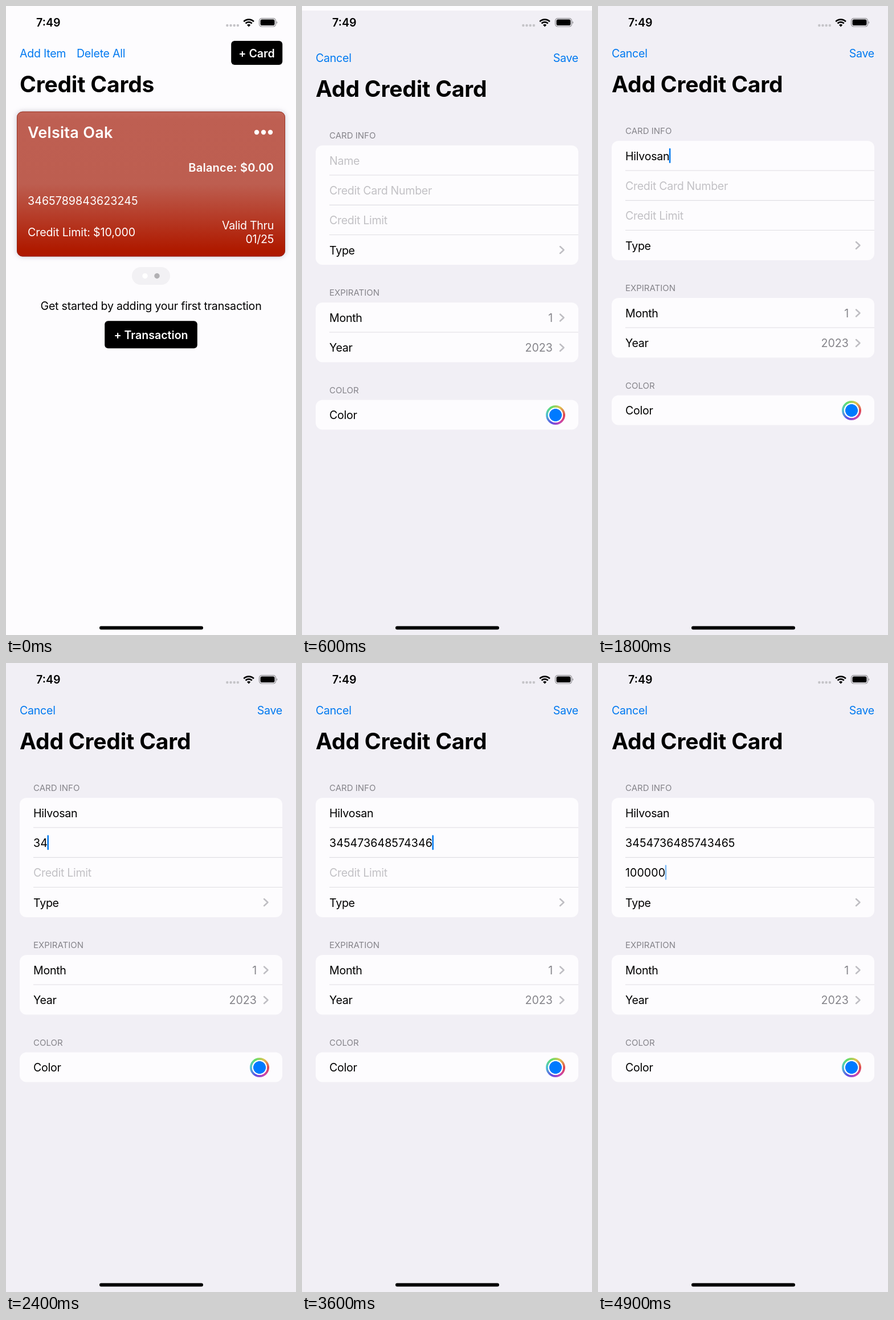
Recreate the animation shown at these times as an HTML page. Size 509 px wide and 1101 px high, loop 5 s.

```html
<!DOCTYPE html>
<html lang="en">
<head>
<meta charset="utf-8">
<title>Add a credit card</title>
<style>
  html, body { margin: 0; width: 100%; height: 100%; overflow: hidden; background: #fdfcfe; }
  svg { display: block; width: 100%; height: 100%; }
  text { font: 400 19.6px Inter, Roboto, sans-serif; letter-spacing: -.014em; font-optical-sizing: none; white-space: pre; }
  .title { font-size: 39px; font-weight: 700; letter-spacing: -.005em; }
  .semi { font-weight: 600; letter-spacing: 0; }
  .bank { font-size: 27px; font-weight: 600; letter-spacing: .01em; }
  .balance { font-size: 20px; font-weight: 600; letter-spacing: .012em; }
  .digits { letter-spacing: .003em; }
  .caption { font-size: 15px; letter-spacing: 0; fill: #85848a; }
  .link { fill: #0079f0; }
  .light { fill: #fff; }
  .hint { fill: #c2c1c5; letter-spacing: -.016em; }
  .value { fill: #85848a; }
  .end { text-anchor: end; }
  .mid { text-anchor: middle; }
  .panel { fill: #fdfcfe; }
  .rule { stroke: #dfdee3; stroke-width: 1.2; }
  .cardShade { filter: drop-shadow(0 0 5px rgba(90, 90, 125, .34)); }
  .wheel {
    width: 34px; height: 34px; border-radius: 50%;
    background:
      radial-gradient(circle, #007aff 10.6px, #fdfcfe 11.3px 12.9px, transparent 13.6px),
      conic-gradient(from 90deg, #e0454f, #c844b4, #5a50e6, #52c2d2, #5fdf6c, #dfc44e, #e0454f);
  }
</style>
</head>
<body>
<svg viewBox="0 0 509 1101" preserveAspectRatio="none">
  <defs>
    <linearGradient id="red" x2="0" y2="1">
      <stop offset="0" stop-color="#c26558"/>
      <stop offset=".06" stop-color="#be5f52"/>
      <stop offset=".5" stop-color="#bd5e50"/>
      <stop offset=".95" stop-color="#af1a00"/>
      <stop offset="1" stop-color="#ae1800"/>
    </linearGradient>
    <path id="chevron" d="M453 -6l6.5 6l-6.5 6" fill="none" stroke="#bfbec3" stroke-width="2.5" stroke-linecap="round" stroke-linejoin="round"/>
  </defs>

  <rect width="509" height="1101" fill="#fdfcfe"/>
  <g id="home">
    <text class="link" x="24" y="89.5">Add Item</text>
    <text class="link" x="124" y="89.5">Delete All</text>
    <rect id="cardButton" x="395.2" y="61" width="90" height="42" rx="6"/>
    <text id="cardLabel" class="semi light mid" x="440" y="89.5">+ Card</text>
    <text class="title" x="24" y="151">Credit Cards</text>

    <rect class="cardShade" x="19" y="184.7" width="471" height="253.8" rx="10" fill="url(#red)"/>
    <rect x="19.5" y="185.2" width="470" height="252.8" rx="9.5" fill="none" stroke="#8e2413" stroke-opacity=".75"/>
    <g class="light">
      <text class="bank" x="38" y="231">Velsita Oak</text>
      <circle cx="440" cy="221" r="4.2"/>
      <circle cx="452" cy="221" r="4.2"/>
      <circle cx="464" cy="221" r="4.2"/>
      <text class="balance end" x="470" y="290">Balance: $0.00</text>
      <text class="digits" x="38" y="347.5">3465789843623245</text>
      <text x="38" y="402.5" style="letter-spacing:-.006em">Credit Limit: $10,000</text>
      <text class="end" x="470" y="391">Valid Thru</text>
      <text class="end" x="470" y="415">01/25</text>
    </g>

    <rect x="221" y="457" width="67" height="31" rx="15.5" fill="#f2f1f4"/>
    <circle cx="244" cy="472.5" r="4.7" fill="#fff"/>
    <circle cx="265" cy="472.5" r="4.7" fill="#b1b0b3"/>
    <text class="mid" x="254.5" y="532" style="letter-spacing:-.011em">Get started by adding your first transaction</text>
    <rect x="173.2" y="551.2" width="162.6" height="48" rx="6"/>
    <text class="semi light mid" x="254.5" y="583">+ Transaction</text>
  </g>

  <g id="sheet">
    <rect width="509" height="1101" fill="#f1eff5"/>
    <text class="link" x="24" y="89.5">Cancel</text>
    <text class="link end" x="485" y="89.5">Save</text>
    <text class="title" x="24" y="151">Add Credit Card</text>

    <text class="caption" x="48" y="224">CARD INFO</text>
    <rect class="panel" x="24" y="236" width="461" height="209" rx="12"/>
    <path class="rule" d="M48 288H485M48 340.3H485M48 392.5H485"/>
    <text class="field" x="48" y="269.5"></text>
    <text class="field digits" x="48" y="322"></text>
    <text class="field digits" x="48" y="374"></text>
    <rect id="caret" width="2.5" height="26" rx="1.2" fill="#0079f0"/>
    <text x="48" y="426.5">Type</text>
    <use href="#chevron" y="419"/>

    <text class="caption" x="48" y="499">EXPIRATION</text>
    <rect class="panel" x="24" y="511" width="461" height="104.5" rx="12"/>
    <path class="rule" d="M48 563H485"/>
    <text x="48" y="544.5">Month</text>
    <text class="value end" x="440" y="544.5">1</text>
    <use href="#chevron" y="537.5"/>
    <text x="48" y="597">Year</text>
    <text class="value digits end" x="440" y="597">2023</text>
    <use href="#chevron" y="590"/>

    <text class="caption" x="48" y="669.5">COLOR</text>
    <rect class="panel" x="24" y="681.5" width="461" height="52" rx="12"/>
    <text x="48" y="715">Color</text>
    <foreignObject x="428" y="690.5" width="34" height="34"><div class="wheel"></div></foreignObject>
  </g>

  <g id="status">
    <text class="semi" x="53" y="36">7:49</text>
    <g fill="#c5c4c8">
      <circle cx="388.3" cy="34" r="2.2"/>
      <circle cx="394.5" cy="34" r="2.2"/>
      <circle cx="400.7" cy="34" r="2.2"/>
      <circle cx="406.9" cy="34" r="2.2"/>
    </g>
    <g fill="none" stroke="#000" stroke-width="2.7">
      <path d="M417.3 27.2a12.6 12.6 0 0 1 17.6 0"/>
      <path d="M420.5 30.5a8 8 0 0 1 11.2 0"/>
    </g>
    <path d="M426.1 36.4l-3.1-3.2a4.5 4.5 0 0 1 6.2 0z"/>
    <rect x="444.5" y="21.7" width="29" height="14.3" rx="4.4" fill="none" stroke="#8d8c90" stroke-width="1.2"/>
    <rect x="446.5" y="23.6" width="25" height="10.5" rx="2.8"/>
    <path d="M474.8 26.5q3 2.3 0 4.8z" fill="#8d8c90"/>
    <rect x="164" y="1085.5" width="182" height="6" rx="3"/>
  </g>
</svg>

<script>
  const TICK = 100, TICKS = 50;
  const byId = id => document.getElementById(id);
  const start = performance.now();

  // Each track lists [tick, value]; a value holds until the next entry.
  const at = (track, tick) => track.findLast(([from]) => from <= tick)[1];

  const sheetTop = [[0, 1101], [5, 802], [6, 8], [7, 1], [8, 0]];
  const buttonAlpha = [[0, 1], [1, .75], [2, .5], [3, .35], [4, .3]];
  const focus = [[0, -1], [9, 0], [21, 1], [40, 2]];
  const caretAlpha = [[0, 1], [11, .5], [12, 1], [20, .5], [21, 1], [39, .5], [40, 1], [49, .5]];

  const fields = [
    { hint: 'Name', text: 'Hilvosan',
      typed: [[0, 0], [13, 2], [14, 3], [15, 4], [16, 5], [17, 7], [18, 8]] },
    { hint: 'Credit Card Number', text: '3454736485743465',
      typed: [[0, 0], [23, 1], [24, 2], [25, 3], [26, 4], [27, 5], [28, 7], [29, 8], [30, 9],
              [31, 10], [32, 11], [33, 12], [34, 13], [35, 14], [36, 15], [37, 16]] },
    { hint: 'Credit Limit', text: '100000',
      typed: [[0, 0], [44, 1], [45, 2], [46, 3], [47, 5], [48, 6]] }
  ];
  document.querySelectorAll('.field').forEach((node, i) => fields[i].node = node);

  function drawField({ node, hint, text, typed }, tick) {
    const count = at(typed, tick);
    node.textContent = count ? text.slice(0, count) : hint;
    node.classList.toggle('hint', !count);
    return count ? node.getComputedTextLength() : 0;
  }

  function draw(tick) {
    byId('sheet').setAttribute('transform', `translate(0 ${at(sheetTop, tick)})`);
    byId('cardButton').style.opacity = byId('cardLabel').style.opacity = at(buttonAlpha, tick);

    const widths = fields.map(field => drawField(field, tick));
    const row = at(focus, tick);
    const caret = byId('caret');
    caret.style.opacity = row < 0 ? 0 : at(caretAlpha, tick);
    if (row >= 0) {
      caret.setAttribute('x', 47.6 + widths[row]);
      caret.setAttribute('y', 249 + row * 52.3);
    }
  }

  let shown = -1;
  function loop() {
    const tick = Math.floor((performance.now() - start) / TICK) % TICKS;
    if (tick !== shown) draw(shown = tick);
    requestAnimationFrame(loop);
  }
  loop();
</script>
</body>
</html>
```
